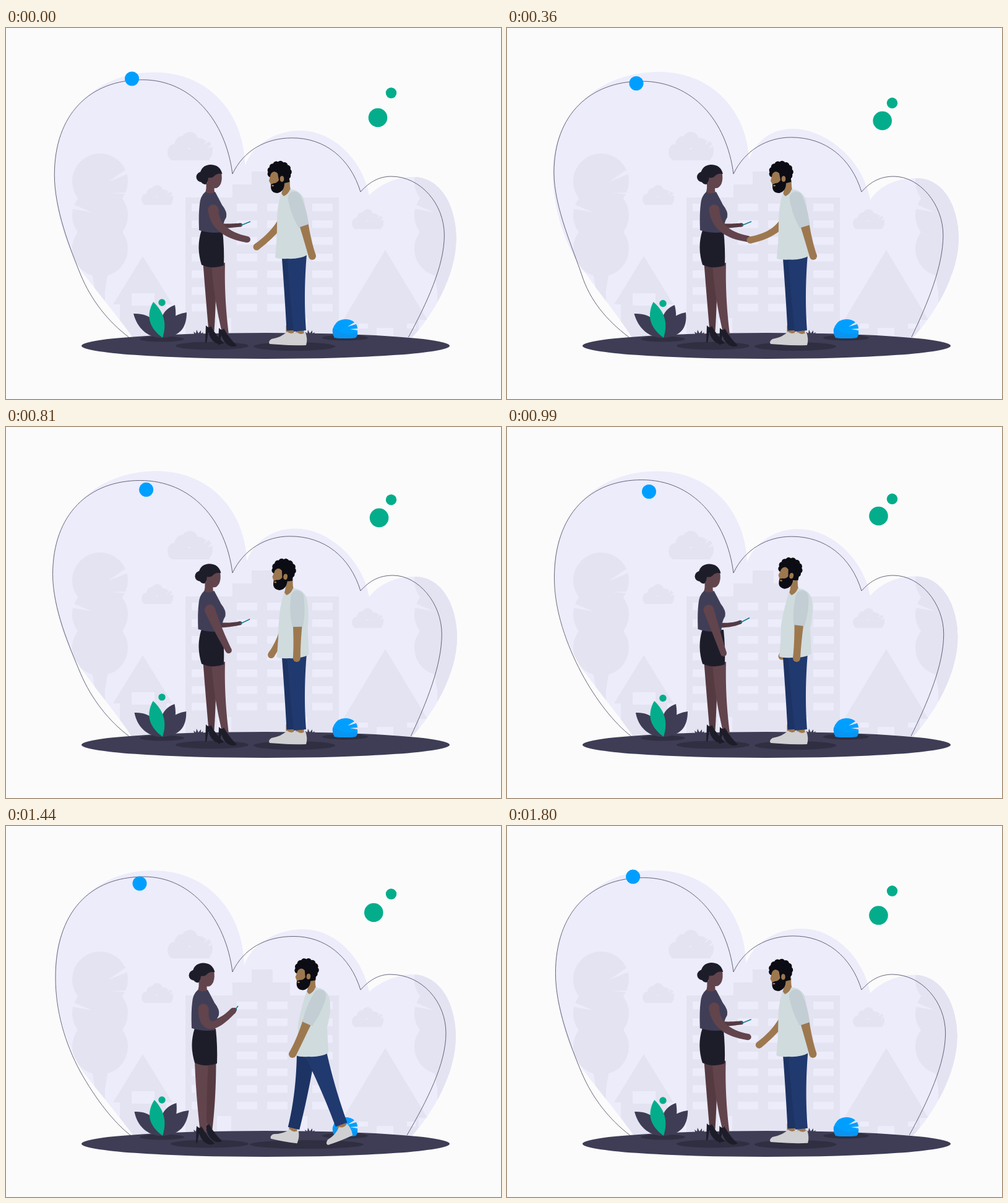
Animation of 800x600 px, one loop 1.83 s. Source, as an HTML page with a canvas:

```html
<!DOCTYPE html>
<html lang="en">
<head>
<meta charset="utf-8">
<title>Handshake</title>
<style>
html, body { margin: 0; width: 100%; height: 100%; overflow: hidden; background: #fbfbfb; }
canvas { display: block; }
</style>
</head>
<body>
<canvas width="800" height="600"></canvas>
<script>
const ctx = document.querySelector('canvas').getContext('2d');
const LOOP = 1830, STEP = 30;
const TIMES = [0, 360, 630, 990, 1200, 1440];
const INK = '#3e3d55', SHADE = '#302f42', BLUE = '#009fff', GREEN = '#03ad8b';
const MIST = '#e4e3f2', SKY = '#ececfb';
const DARK_SKIN = '#62444c', DEEP_SKIN = '#553a42', BLACK = '#1d1d2a';
const TAN = '#9d784f', HAIR = '#0c0c14';
let time = 0;

// Cyclic monotone cubic through one value per key time
function at(...v) {
  const n = TIMES.length;
  const when = i => TIMES[(i + n) % n] + LOOP * Math.floor(i / n);
  const val = i => v[(i + n) % n];
  const slope = i => (val(i + 1) - val(i)) / (when(i + 1) - when(i));
  const tangent = i => {
    const a = slope(i - 1), b = slope(i);
    return a * b <= 0 ? 0 : 2 * a * b / (a + b);
  };
  let i = n - 1;
  while (TIMES[i] > time) i--;
  const h = when(i + 1) - when(i), u = (time - when(i)) / h, w = 1 - u;
  return w * w * (1 + 2 * u) * val(i) + u * u * (3 - 2 * u) * val(i + 1)
    + h * u * w * (w * tangent(i) - u * tangent(i + 1));
}
// Standing value, then the two walking values
const gait = (stand, a, b) => at(stand, stand, stand, stand, a, b);

function shape(color, d, x = 0, y = 0, turn = 0) {
  ctx.save();
  ctx.translate(x, y);
  ctx.rotate(turn);
  ctx.fillStyle = color;
  ctx.fill(new Path2D(d));
  ctx.restore();
}
function oval(color, x, y, rx, ry = rx) {
  ctx.fillStyle = color;
  ctx.beginPath();
  ctx.ellipse(x, y, rx, ry, 0, 0, 7);
  ctx.fill();
}
function rect(color, ...box) {
  ctx.fillStyle = color;
  ctx.fillRect(...box);
}
// Tapered curve through three [x, y, width] points
function limb(color, a, m, b, capA = false, capB = false) {
  const left = [], right = [];
  const c = m.map((q, i) => 2 * q - (a[i] + b[i]) / 2);
  for (let i = 0; i <= 16; i++) {
    const t = i / 16, s = 1 - t;
    const [x, y, w] = a.map((q, j) => s * s * q + 2 * s * t * c[j] + t * t * b[j]);
    const [dx, dy] = a.map((q, j) => s * (c[j] - q) + t * (b[j] - c[j]));
    const k = w / 2 / (Math.hypot(dx, dy) || 1);
    left.push([x - dy * k, y + dx * k]);
    right.unshift([x + dy * k, y - dx * k]);
  }
  shape(color, 'M' + left.concat(right).join('L') + 'Z');
  if (capA) oval(color, a[0], a[1], a[2] / 2);
  if (capB) oval(color, b[0], b[1], b[2] / 2);
}

function blobPath() {
  const p = at(.25, 1, .85, .5, .3, 0);
  const m = (a, b) => a + (b - a) * p;
  const cusp = [m(385, 391), m(225, 213)], gap = [587, m(268, 278)];
  const top = m(480, 462), high = m(167, 163), right = m(727, 730), edge = m(80, 74);
  return new Path2D(`M${m(207, 203)} 502C182 468 150 430 128 ${m(402, 398)}
    C100 365 ${edge} 300 ${edge} 235C${edge} 140 145 ${m(72, 71)} ${m(237, 247)} ${m(72, 71)}
    C${m(328, 336)} 72 ${m(383, 389)} 140 ${cusp}
    C${m(398, 400)} 190 ${top - 42} ${high} ${top} ${high}
    C${top + 52} ${high} 576 212 ${gap}
    C605 252 632 ${m(240, 243)} ${m(656, 663)} ${m(240, 243)}
    C${right - 24} ${m(240, 243)} ${right} 290 ${right} 340C${right} 400 690 465 655 502Z`);
}
function linePath() {
  const p = at(.35, .82, 1, .7, .4, 0), w = at(.65, 1, 1, .1, 0, 0);
  const m = (a, b) => a + (b - a) * p, n = (a, b) => a + (b - a) * w;
  const edge = m(80, 75), top = m(82, 87), right = m(711, 703.5), high = m(178.5, 176.5);
  return new Path2D(`M${n(201, 197)} 500C${n(175, 160)} ${n(480, 472)} ${n(145, 134)} ${n(442, 440)} ${n(120, 121)} ${n(397, 400)}
    C${n(95, 108)} ${n(351, 360)} ${edge} ${n(298, 290)} ${edge} ${n(245, 234)}
    C${edge} 140 135 ${top} ${m(223, 216)} ${top}C300 ${top} 355 150 366 236
    C384 198 420 ${high} ${m(465, 458)} ${high}C515 ${high} 556 210 573 265
    C588 248 604 240 ${m(621, 626)} 240C${right - 38} 240 ${right} 285 ${right} 335
    C${right} 385 680 445 ${m(648, 655)} 500`);
}

function cloud(x, y, s) {
  ctx.save();
  ctx.translate(x, y);
  ctx.scale(s, s);
  oval(MIST, 10, 33, 10, 13);
  oval(MIST, 23, 22, 12, 15);
  oval(MIST, 36, 13, 13, 13);
  oval(MIST, 51, 25, 14, 15);
  oval(MIST, 63, 30, 10, 16);
  rect(MIST, 6, 28, 62, 18);
  shape(SKY, 'M58 22L66 10L68 14ZM64 27L73 18L74 23Z');
  ctx.restore();
}
function tree(x) {
  ctx.save();
  ctx.translate(x, 0);
  for (const y of [248, 303, 357]) oval(MIST, 152, y, 45);
  shape(MIST, 'M138 390H166L160 425V445H144V425Z');
  shape(SKY, 'M165 249L192 230L199 235ZM170 267L199 266V269ZM105 284L139 298L105 292Z');
  ctx.restore();
}
function town() {
  cloud(261, 168, 1);
  cloud(219, 254, .7);
  cloud(559, 293, .7);
  tree(0);
  tree(553);
  rect(MIST, 290, 274, 248, 224);
  rect(MIST, 366, 253, 93, 24);
  rect(MIST, 397, 232, 34, 24);
  for (const x of [300, 373, 422, 495])
    for (let y = 284; y < 450; y += 27) rect(SKY, x, y, 33, 12.5);
  rect(SKY, 341, 469, 23, 29);
  rect(SKY, 464, 469, 23, 29);
  shape(MIST, 'M221 369L269 447H259V500H184V447H173Z');
  rect(SKY, 203, 429, 37, 20);
  shape(MIST, 'M613 359L681 472H667V500H560V472H545Z');
  rect(SKY, 570, 478, 15, 8);
  rect(SKY, 599, 485, 27, 15);
  rect(SKY, 648, 478, 14, 8);
}

function ground() {
  for (const x of [311, 491])
    shape(INK, 'M-6 5L-8 -1L-4 2L-3 -4L0 2L4 -3L4 2L8 0L6 5Z', x, 492);
  oval(INK, 419.5, 514, 297.5, 21);
  oval(SHADE, 252, 503, 36, 4.5);
  oval(SHADE, 548, 501, 37, 4.5);
  oval(SHADE, gait(333, 326, 329), 514, gait(59, 60, 63), 6.5);
  oval(SHADE, gait(466, 522, 486), 515, gait(66, 80, 92), 7);
}
function plant() {
  const r = at(0, -3, -1.5, 0, 1.5, 3.5), l = at(0, -.5, 1, 2, 2.5, 1.5);
  shape(INK, `M250 501C228 500 212 485 ${206 + l} 462C234 461 247 476 252 501Z
    M250 501C246 474 252 455 ${273 + r * .7} 448C278 475 268 492 252 501Z
    M251 501C258 475 270 463 ${292 + r} 460C292 486 280 500 251 501Z`);
  shape(GREEN, `M253 501C234 487 224 468 ${238 + r * .5} 443C254 458 261 476 253 501Z`);
  oval(GREEN, 252, at(444, 445.5, 436, 438.5, 440.5, 443), 5.7);
}
function ball() {
  shape(BLUE, 'M531 501Q525 491 530 482Q536 471 548 471Q558 471 563 476L552 483L566 479Q568 483 568 486L556 487L568 489Q569 497 565 501Q547 503 531 501Z');
  shape('#0995f1', 'M528 486Q536 488 541 492Q550 497 568 492Q568 498 565 501Q547 503 531 501Q527 494 528 486Z');
}

function heel(x, y) {
  shape(BLACK, 'M-9 -3L-10 24L-8 25L-5 9Q0 24 11 27Q18 28 20 25Q10 17 -1 -2Q-4 3 -9 -3Z', x, y);
}
function woman() {
  const hip = gait(0, -11, -11), body = at(0, 0, -.5, -3.5, -13, -12);
  const hx = at(0, -.5, -1, -4, -9, -12), hy = at(0, 0, 0, .5, 1.5, .5);
  const phone = [at(379, 379, 379, 377, 366, 370), at(318.5, 318.5, 318, 315.5, 297, 297)];
  const tip = [at(395, 395, 395, 392, 373, 375), at(313, 313, 312, 308.5, 290, 291)];

  limb(DEEP_SKIN, [340 + body, 320, 9], [gait(359, 345, 346), gait(320, 313, 313), 7], [...phone, 6], true, true);
  ctx.strokeStyle = '#167f91';
  ctx.lineWidth = 1.6;
  ctx.beginPath();
  ctx.moveTo(phone[0], phone[1] + 1);
  ctx.lineTo(...tip);
  ctx.stroke();

  const far = gait(332, 329, 329), near = gait(353, 316, 317);
  limb(DEEP_SKIN, [329, 380, 21], [gait(331, 330, 330), 437, 16], [far, 490, 9]);
  heel(far, 484);
  limb(DARK_SKIN, [gait(343, 315, 316), 380, 22], [gait(346.5, 315.5, 316.5), 437, 16.5], [near + 2, 496, 10]);
  heel(near, 488);
  shape(BLACK, 'M316 327L350 328Q353 356 352 384Q334 391 316 383Q307 354 316 327Z', hip);
  shape(DARK_SKIN, 'M323 250L338 252Q335 263 338 267L334 273L321 269Q325 260 323 250Z', hx);
  shape('#403e57', 'M322 265Q329 270 338 265Q345 278 349 286Q358 297 356 306Q350 315 350 330Q331 333 312 327Q311 300 313 285Q314 272 322 265Z', body);
  shape(DARK_SKIN, 'M324 235L348 234Q350 244 347 252Q343 260 337 259Q326 256 324 245Z', hx, hy);
  oval(BLACK, 316.5 + hx, 241 + hy, 9, 8.5);
  shape(BLACK, 'M313 238Q315 222 330 221Q346 221 349.5 236Q341 234 336 240Q333 243 327 242Q326 252 322 253Q313 252 313 238Z', hx, hy);

  limb(DARK_SKIN,
    [at(335, 335, 332, 326, 317, 319), at(294, 294, 295, 296, 296, 296), 17],
    [at(350, 350, 348, 338, 329, 331), at(325, 325, 327, 331, 322, 322), 13],
    [at(390, 389, 375, 350, 364, 367), at(342, 341, 353, 366, 300, 299), 10], true, true);
}

function shoe(x, y, turn) {
  limb(TAN, [x, y - 8, 13], [x, y, 13], [x, y + 8, 13]);
  shape('#d0d0d2', 'M-5 2Q-13 11 -30 14Q-36 18 -33 22Q-10 24 10 23Q13 13 9 2Q2 8 -5 2Z', x, y, turn);
}
function head(x, y, turn) {
  ctx.save();
  ctx.translate(x, y);
  ctx.rotate(turn);
  oval(HAIR, 1, 0, 16);
  for (let a = 2.9; a < 7.2; a += .48)
    oval(HAIR, 14.5 * Math.cos(a), 13 * Math.sin(a), 5.3);
  shape(HAIR, 'M-14 14L0 8L16 4L16 16L8 18Q8 31 -3 34Q-14 34 -14 23Z');
  shape(TAN, 'M-14 3Q-9 -4 -3 2L-1 13Q-4 18 -9 18L-14 20L-17 14Z');
  oval(TAN, 4, 11, 3.3, 4.7);
  oval(TAN, -11, 22, 2, 1.3);
  ctx.restore();
}
function man() {
  const nx = at(0, 1, 2, 11, 79, 41), ny = gait(0, -6, 0);
  const bx = at(0, 1, 1.5, 5, 68, 34), by = at(0, 1.5, 1.5, 0, -9, 0);
  const N = (x, y) => `${x + nx} ${y + ny} `, B = (x, y) => `${x + bx} ${y + by} `;

  limb(TAN, [450 + nx, 305 + ny, 14],
    [at(432, 430, 437, 456, 524, 486), at(330, 329, 340, 340, 335, 340), 11],
    [at(405, 393, 417, 444, 524, 480), at(354, 343, 363, 371, 350, 355), 11], false, true);

  const fx = gait(459, 517, 464), fy = gait(489, 483, 489);
  shoe(fx, fy, gait(0, -.12, .15));
  limb('#1c3364', [gait(460, 519, 485), gait(366, 358, 366), gait(29, 36, 30)],
    [gait(461, 508, 477), gait(430, 418, 430), 22], [fx + gait(4, -1, 1), fy, 19]);
  const kx = gait(475, 551, 542), ky = gait(490, 490, 483);
  shoe(kx, ky, gait(0, 0, -.4));
  limb('#20396f', [gait(470, 530, 500), gait(366, 358, 366), gait(32, 38, 36)],
    [gait(471, 543, 521), gait(430, 420, 425), 24], [kx, ky, 20]);

  shape(TAN, `M${N(447, 251)}L${N(459, 246)}Q${N(458, 257)}${N(461, 265)}L${N(448, 274)}L${N(445, 268)}Q${N(448, 261)}${N(447, 251)}Z`);
  shape('#d0dbde', `M${N(445, 267)}Q${N(447, 271)}${N(449, 272)}Q${N(456, 269)}${N(459, 261)}Q${N(475, 262)}${N(481, 276)}
    Q${N(486, 296)}${B(485, 325)}L${B(487, 367)}Q${B(475, 374)}${B(455, 373)}Q${B(440, 374)}${B(435, 371)}
    Q${B(438, 340)}${B(438, 320)}Q${N(437, 290)}${N(445, 267)}Z`);
  head(at(442, 443, 445, 458, 523, 486), 233 + at(0, 0, -1, -4, -7, -1), at(0, 0, .05, .2, .1, .1));

  const ex = at(481, 481, 471, 472, 535, 487), ey = at(320, 321, 324, 321, 316, 320);
  const px = at(495, 495, 474, 468, 525, 463), py = at(369, 369, 374, 374, 369, 369);
  limb(TAN, [ex, ey - 4, 15], [(ex + px) / 2, (ey + py) / 2, 12], [px, py, 12], false, true);
  limb('#c2ced3', [466 + nx, 275 + ny, 21],
    [(466 + nx + ex) / 2, (275 + ny + ey) / 2, 23], [ex, ey, 17], true);
}

function draw(now) {
  time = Math.floor(now % LOOP / STEP) * STEP;
  rect('#fbfbfb', 0, 0, 800, 600);
  const blob = blobPath();
  ctx.save();
  ctx.clip(blob);
  rect(SKY, 0, 0, 800, 600);
  town();
  ctx.restore();
  ctx.strokeStyle = '#55546a';
  ctx.lineWidth = .9;
  ctx.stroke(linePath());
  oval(BLUE, at(203.5, 209, 221, 229.5, 225, 216), at(82, 89.5, 96, 104.5, 103.5, 93), 11.5);
  oval(GREEN, at(601, 606.7, 605, 600.5, 596.5, 594.3), at(145, 150, 149, 144, 141, 140), 15.3);
  oval(GREEN, 622.5, at(105, 121.3, 119, 116.3, 113.7, 110), 8.7);
  ground();
  plant();
  ball();
  woman();
  man();
}
function loop() {
  draw(performance.now());
  requestAnimationFrame(loop);
}
loop();
</script>
</body>
</html>
```
